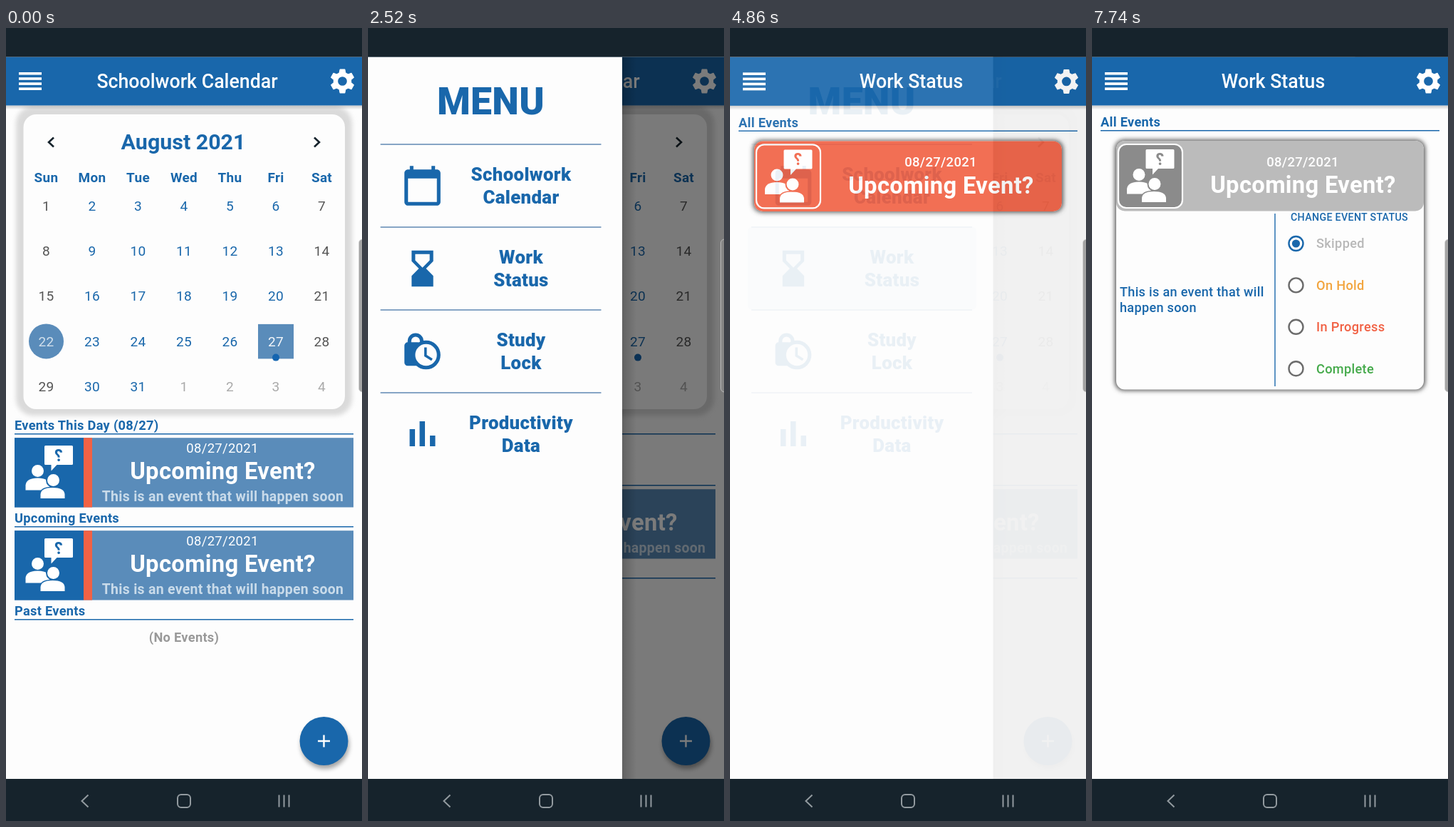
Animation of 500x1111 px, one loop 8 s. Source, as an HTML page:

```html
<!DOCTYPE html>
<html lang="en">
<head>
<meta charset="utf-8">
<title>Schoolwork Calendar</title>
<style>
html, body { margin: 0; width: 100%; height: 100%; overflow: hidden; background: #fdfdfd; }
svg { display: block; width: 500px; height: 1111px; }
text { font-family: Roboto, sans-serif; letter-spacing: .3px; white-space: pre; }
.tight { letter-spacing: 0; }
</style>
</head>
<body>
<svg id="stage" viewBox="0 0 500 1111"></svg>
<script>
const DP = 500 / 411.43;
const TOP = 40.5, BAR_END = 108.5, BOTTOM = 1052;
const BLUE = '#1967ab', STEEL = '#5a8cba', ORANGE = '#f16245', PAPER = '#fdfdfd', DARK = '#16232c';

// ---- drawing helpers (y of a text is the middle of its capitals) ----
const text = (x, y, dp, weight, fill, str, anchor = 'middle', extra = '') =>
  `<text x="${x}" y="${y + dp * DP * .3555}" font-size="${dp * DP}" font-weight="${weight}" fill="${fill}" text-anchor="${anchor}" ${extra}>${str}</text>`;
const rect = (x, y, w, h, fill, r = 0, extra = '') =>
  `<rect x="${x}" y="${y}" width="${w}" height="${h}" rx="${r}" fill="${fill}" ${extra}/>`;
const circle = (x, y, r, fill, extra = '') => `<circle cx="${x}" cy="${y}" r="${r}" fill="${fill}" ${extra}/>`;
const line = (d, color, width, extra = '') =>
  `<path d="${d}" fill="none" stroke="${color}" stroke-width="${width}" ${extra}/>`;
const group = (id, content, extra = '') => `<g id="${id}" ${extra}>${content}</g>`;
const at = (x, y, scale, content) => `<g transform="translate(${x} ${y}) scale(${scale})">${content}</g>`;
const page = (fill, extra) => rect(0, TOP, 500, BOTTOM - TOP, fill, 0, extra);

const gear = at(472.5, 74.5, 1.77,
  [0, 60, 120, 180, 240, 300].map(a =>
    `<path d="M-1.9-9.3h3.8l.8 4h-5.4z" fill="#fff" stroke="#fff" stroke-width=".6" stroke-linejoin="round" transform="rotate(${a})"/>`).join('') +
  circle(0, 0, 5.4, 'none', 'stroke="#fff" stroke-width="3.6"'));

const appBar = title =>
  rect(0, BAR_END, 500, 6, 'url(#barShade)') + rect(0, TOP, 500, BAR_END - TOP, BLUE) +
  [62, 69.2, 76.3, 83.4].map(y => rect(18, y, 32, 3.6, '#fff')).join('') +
  text(254.5, 74.5, 22, 500, '#fff', title, 'middle', 'class="tight"') + gear;

const people = (x, y, back) => at(x, y, 1,
  `<path d="M-5-37.5h37q1.5 0 1.5 1.5v24q0 1.5-1.5 1.5H11L3-2V-10.5H-5q-1.5 0-1.5-1.5v-24q0-1.5 1.5-1.5z" fill="#fff"/>` +
  `<g transform="translate(13 -24) scale(-1 1)">${text(0, 0, 19, 700, back, '?')}</g>` +
  circle(-16, -2, 8.5, '#fff') +
  `<path d="M-33 25v-7q1-10 17-10t17 10v7z" fill="#fff"/>` +
  `<path d="M-12 36.5v-6q1-9 17-9t17 9v6z" fill="#fff" stroke="${back}" stroke-width="3" paint-order="stroke"/>` +
  circle(6, 11, 10.5, back) + circle(6, 11, 8.5, '#fff'));

// ---- calendar page ----
const heading = (y, title) => text(12, y, 15, 700, BLUE, title, 'start') + line(`M12 ${y + 11.8}H488`, BLUE, 1.5);

const section = (y, title, hasEvent) => heading(y, title) + (hasEvent
  ? rect(12, y + 17.2, 476, 97.3, STEEL) + rect(12, y + 17.2, 97, 97.3, BLUE) + rect(109, y + 17.2, 12, 97.3, ORANGE) +
    people(60.5, y + 65.5, BLUE) +
    text(304, y + 31.5, 15.2, 400, '#fff', '08/27/2021') +
    text(304.5, y + 63.5, 27, 700, '#fff', 'Upcoming Event?') +
    text(304.5, y + 99.5, 16, 700, '#c9dbea', 'This is an event that will happen soon')
  : text(250, y + 36.5, 15, 700, '#999', '(No Events)'));

function sections(list) {
  let y = 557;
  return list.map(([title, hasEvent]) => {
    const out = section(y, title, hasEvent);
    y += hasEvent ? 130 : 72;
    return out;
  }).join('');
}

const dayX = col => 56.5 + 64.5 * col;
const dayY = row => 249 + 63.3 * row;

function days(selected) {
  let out = circle(dayX(0), dayY(3), 24.5, STEEL);
  for (let i = 0; i < 35; i++) {
    const col = i % 7, x = dayX(col), y = dayY(i / 7 | 0), day = i + 1;
    let color = day > 31 ? '#aaa' : col % 6 ? BLUE : '#555';
    if (day === 22) color = '#d2e0ec';
    if (day === selected) {
      color = '#f4f7fa';
      out += rect(x - 25, y - 24, 50, 48.5, STEEL);
    }
    out += text(x, y, 15.7, 400, color, day > 31 ? day - 31 : day);
  }
  return out + circle(dayX(5), dayY(3) + 22.7, 5, '#1565b0');
}

const dayView = (id, day) => group(id, days(day) + sections([
  [`Events This Day (08/${day})`, day === 27], ['Upcoming Events', true], ['Past Events', false]]));

const calendarPage =
  page(PAPER) +
  rect(14, 110, 472, 433, '#dadada', 24, 'filter="url(#soft)"') + rect(24.5, 121, 451.5, 413, PAPER, 18) +
  appBar('Schoolwork Calendar') +
  circle(40, 75, 34.5, '#000', 'id="ripple" opacity="0"') +
  line('M67 153.5L60 160l7 6.5', DARK, 2.6) + line('M433 153.5l7 6.5l-7 6.5', DARK, 2.6) +
  text(249, 159, 25, 700, BLUE, 'August 2021', 'middle', 'class="tight"') +
  ['Sun', 'Mon', 'Tue', 'Wed', 'Thu', 'Fri', 'Sat'].map((d, i) => text(dayX(i), 209.5, 15.6, 700, BLUE, d)).join('') +
  dayView('day27', 27) + dayView('day24', 24) +
  circle(448, 1004, 34, '#000', 'opacity=".35" filter="url(#soft)"') + circle(446.5, 999, 34, BLUE) +
  line('M438 999h17M446.5 990.5v17', '#fff', 2.4);

// ---- drawer ----
const DRAWER = 369.5;
const item = (k, a, b) => line(`M30 ${163 + 116 * k}H340`, '#5f89b3', 1.5) +
  text(227.5, 205 + 116 * k, 21.3, 900, BLUE, a) + text(227.5, 236.5 + 116 * k, 21.3, 900, BLUE, b);
const icon = (k, content) => at(89 - 30.4, 221 + 116 * k - 30.4, 2.533, content);
const solid = d => `<path d="${d}" fill="${BLUE}"/>`;

const drawer =
  rect(DRAWER, TOP, 20, BOTTOM - TOP, 'url(#drawerShade)') + rect(0, TOP, DRAWER, BOTTOM - TOP, PAPER) +
  rect(25, 278.5, 321, 116, '#e0f0fb', 6, 'id="highlight"') +
  text(185, 101.5, 44, 900, BLUE, 'MENU') +
  item(0, 'Schoolwork', 'Calendar') + item(1, 'Work', 'Status') + item(2, 'Study', 'Lock') + item(3, 'Productivity', 'Data') +
  icon(0, solid('M20 3h-1V1h-2v2H7V1H5v2H4c-1.1 0-2 .9-2 2v16c0 1.1.9 2 2 2h16c1.1 0 2-.9 2-2V5c0-1.1-.9-2-2-2zm0 18H4V8h16z')) +
  icon(1, solid('M18 22v-6l-4-4 4-4V2H6v6l4 4-4 4v6zM8 7.5V4h8v3.5l-4 4z')) +
  icon(2, rect(2, 7, 9, 13, BLUE, 1.8) + line('M4.8 8V6.3a3.4 3.4 0 0 1 6.8 0V8', BLUE, 2) +
    circle(14, 14, 7, PAPER, `stroke="${BLUE}" stroke-width="2"`) + line('M13.7 9.8v4.6l3.6 2.2', BLUE, 1.4)) +
  rect(71, 562, 7.5, 24, BLUE) + rect(85, 551, 7.5, 35, BLUE) + rect(99.5, 571, 7.5, 15, BLUE);

// ---- work status page ----
const statuses = [['Skipped', '#b8b8b8'], ['On Hold', '#f2a53f'], ['In Progress', ORANGE], ['Complete', '#45aa4b']];
const radioY = i => 302 + 58.4 * i;

const details =
  line('M257 260V502', BLUE, 1.4) +
  text(39, 370, 14.9, 500, BLUE, 'This is an event that will', 'start') +
  text(39, 392, 14.9, 500, BLUE, 'happen soon', 'start') +
  text(361.5, 264.7, 11.75, 500, BLUE, 'CHANGE EVENT STATUS') +
  statuses.map(([label, color], i) =>
    circle(286.5, radioY(i), 10, 'none', `id="ring${i}" stroke-width="2.4"`) +
    circle(286.5, radioY(i), 0, BLUE, `id="dot${i}"`) +
    text(315, radioY(i), 15, 500, color, label, 'start')).join('');

const cardHeader = (id, fill, iconFill) => group(id,
  rect(34, 158, 432, 98.5, fill, 12) +
  rect(37, 163, 90, 89, iconFill, 11, 'stroke="#fff" stroke-width="2.2"') +
  people(82, 207.5, iconFill));

const workPage =
  page(PAPER) + appBar('Work Status') + heading(132, 'All Events') +
  rect(32, 156.5, 436, 0, '#555', 13, 'id="cardShade" filter="url(#soft)"') +
  rect(34, 158, 432, 0, PAPER, 12, 'id="card"') +
  group('details', details, 'clip-path="url(#cardClip)"') +
  cardHeader('busy', ORANGE, ORANGE) + cardHeader('skipped', '#bbb', '#8b8b8b') +
  text(296, 187.5, 15.2, 500, '#fff', '08/27/2021') + text(296.5, 219.5, 27, 700, '#fff', 'Upcoming Event?');

const systemBars =
  rect(0, 0, 500, TOP, DARK) + rect(0, BOTTOM, 500, 59, DARK) +
  line('M115.5 1074.5l-9 8.5l9 8.5', '#929a9f', 2) +
  rect(241, 1074, 18, 18, 'none', 5, 'stroke="#929a9f" stroke-width="2"') +
  line('M383.5 1074.5v17M390.5 1074.5v17M397.5 1074.5v17', '#929a9f', 2) +
  rect(495.5, 296, 12, 214, '#888', 5, 'fill-opacity=".75" stroke="#ddd" stroke-opacity=".6"');

const fade = (id, direction) =>
  `<linearGradient id="${id}" ${direction}><stop stop-color="#000" stop-opacity=".2"/><stop offset="1" stop-color="#000" stop-opacity="0"/></linearGradient>`;

const stage = document.getElementById('stage');
stage.innerHTML = `<defs>
  <filter id="soft" x="-20%" y="-20%" width="140%" height="140%"><feGaussianBlur stdDeviation="3.2"/></filter>
  ${fade('barShade', 'x2="0" y2="1"')}${fade('drawerShade', '')}
  <clipPath id="cardClip"><rect id="clipBox" x="34" y="158" width="432" height="0"/></clipPath>
</defs>` +
  group('calendar', calendarPage) + page('#000', 'id="scrim"') +
  group('drawer', drawer) + group('work', workPage) + systemBars;

// ---- motion ----
const el = {};
stage.querySelectorAll('[id]').forEach(node => el[node.id] = node);
const set = (id, attr, value) => el[id].setAttribute(attr, value);
const show = (id, on) => el[id].style.display = on ? '' : 'none';
const ramp = (t, start, length) => Math.min(1, Math.max(0, (t - start) / length));

function bezier(x1, y1, x2, y2) {
  const f = (a, b, u) => 3 * a * u * (1 - u) ** 2 + 3 * b * u * u * (1 - u) + u ** 3;
  return x => {
    let lo = 0, hi = 1;
    for (let i = 0; i < 24; i++) {
      const mid = (lo + hi) / 2;
      if (f(x1, x2, mid) < x) lo = mid; else hi = mid;
    }
    return f(y1, y2, lo);
  };
}
const fastOutSlowIn = bezier(.4, 0, .2, 1), easeIn = bezier(.42, 0, 1, 1);

// Critically damped spring, stiffness 500, starting with velocity 1.
function spring(ms) {
  const s = Math.max(0, ms) / 1000, w = Math.sqrt(500);
  return 1 - (1 + (w - 1) * s) * Math.exp(-w * s);
}

function render(t) {
  const picked = t >= 1200;
  show('day27', !picked);
  show('day24', picked);
  set('ripple', 'opacity', .025 * ramp(t, 2100, 120) * (1 - ramp(t, 2300, 200)));

  const open = spring(t - 2290);
  show('drawer', t >= 2280);
  set('drawer', 'transform', `translate(${DRAWER * (open - 1)} 0)`);
  set('scrim', 'opacity', .535 * open);
  set('highlight', 'opacity', ramp(t, 4330, 200));

  const enter = ramp(t, 4577, 300);
  show('work', enter > 0);
  set('work', 'opacity', easeIn(enter));
  set('work', 'transform', `translate(0 ${(BOTTOM - TOP) / 4 * (1 - fastOutSlowIn(enter))})`);

  const grow = fastOutSlowIn(ramp(t, 6180, 240)), height = 98.5 + 250 * grow;
  set('card', 'height', height);
  set('clipBox', 'height', height);
  set('cardShade', 'height', height + 3);
  show('details', grow > 0);

  const skip = ramp(t, 7260, 200), skipped = skip > 0;
  show('busy', !skipped);
  show('skipped', skipped);
  statuses.forEach((_, i) => {
    set('ring' + i, 'stroke', i === (skipped ? 0 : 2) ? BLUE : '#6c6c6c');
    set('dot' + i, 'r', 5.6 * (i === 0 ? skip : i === 2 ? 1 - skip : 0));
  });
}

function tick() {
  render(performance.now() % 8000);
  requestAnimationFrame(tick);
}
tick();
</script>
</body>
</html>
```
